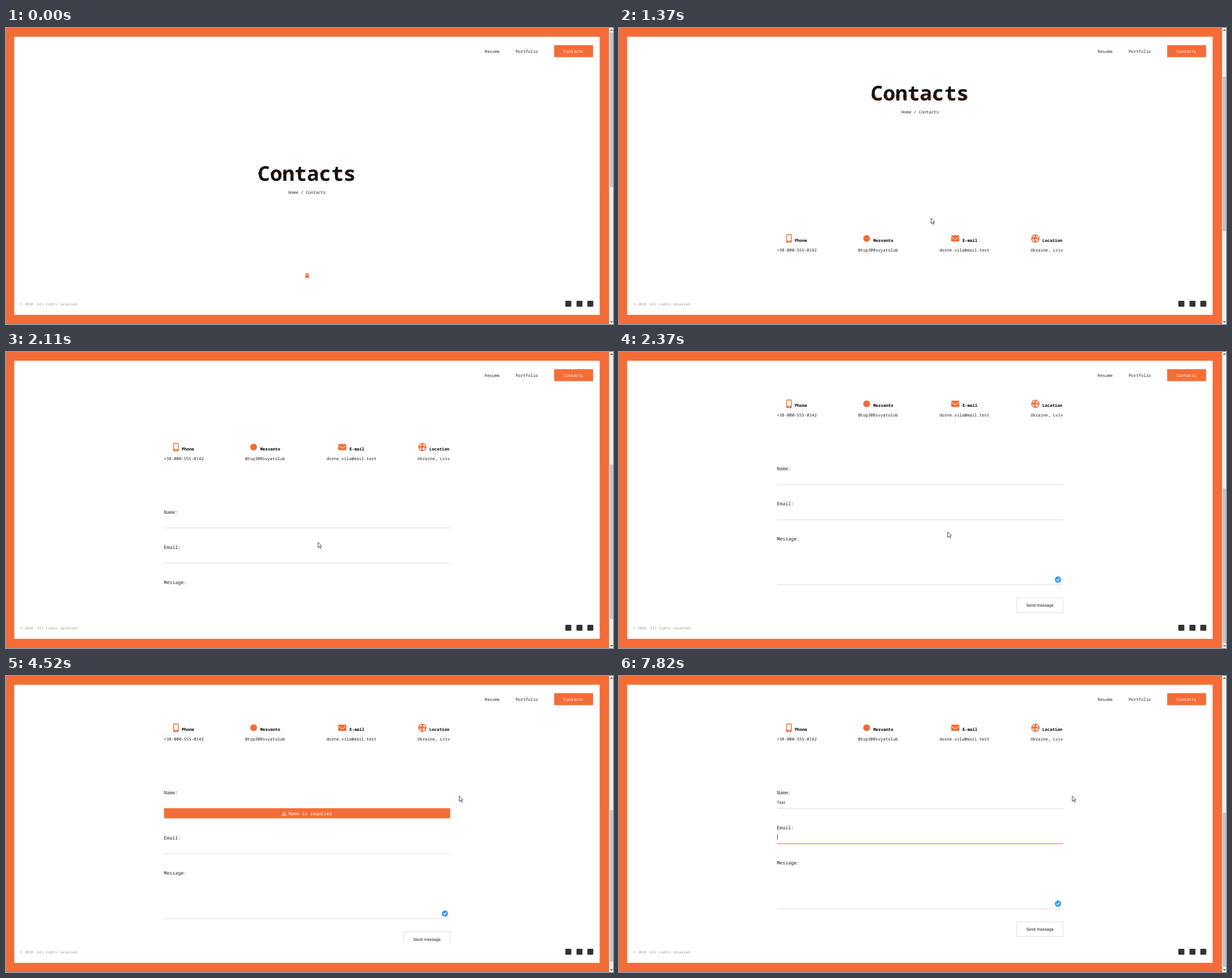
An HTML page for the animation above (8000 ms loop, 1070 px wide and 523 px high).

```html
<!DOCTYPE html>
<html lang="en">
<head>
<meta charset="utf-8">
<title>Contacts</title>
<style>
  html, body { margin: 0; width: 100%; height: 100%; overflow: hidden; background: #f46d38; }
  svg { display: block; }
  text { font: 7.33px "Noto Sans Mono", "DejaVu Sans Mono", monospace; fill: #222; white-space: pre; text-rendering: geometricPrecision; }
  .title { font-size: 36px; font-weight: 700; fill: #141414; }
  .bold { font-weight: 700; fill: #000; }
  .label { font-size: 8.4px; }
  .ui { font-family: Roboto, Arial, sans-serif; }
  .small { font-size: 6.14px; fill: #999; }
  .note { font-size: 7.9px; }
  .white { fill: #fff; }
  .orange { fill: #f46d38; }
  .line { fill: #dcdcdc; }
  .dark { fill: #333; }
  .stroke { fill: none; stroke: #fff; }
</style>
</head>
<body>
<svg width="1070" height="523" viewBox="0 0 1070 523">
  <defs>
    <clipPath id="view"><rect x="15" y="83" width="1031" height="388.6"/></clipPath>
    <clipPath id="band"><rect id="bandRect" x="430" width="200"/></clipPath>
  </defs>

  <rect class="orange" width="1063" height="523"/>
  <rect class="white" x="14.5" y="15.5" width="1032" height="491.3"/>

  <g clip-path="url(#view)">
    <g id="page">
      <text class="title" x="443.8" y="269.5">Contacts</text>
      <g clip-path="url(#band)">
        <text class="title orange" x="444.9" y="269.7">Contacts</text>
        <text class="title" x="443.3" y="269.5">Contacts</text>
      </g>
      <text x="497.7" y="292.6">Home / Contacts</text>
      <g id="mouse">
        <rect class="orange" x="527.6" y="-4.6" width="6.4" height="9.2" rx="3"/>
        <path class="stroke" stroke-width=".7" d="M527.4 -1.2H534.2M530.8 -4.7V-1.2"/>
      </g>

      <g transform="translate(0 422)">
        <!-- phone -->
        <rect class="orange" x="294.8" y="84" width="9.6" height="15" rx="1.6"/>
        <rect class="white" x="296.3" y="85.5" width="6.6" height="9.8" rx=".3"/>
        <circle class="white" cx="299.6" cy="97.1" r=".9"/>
        <text class="bold" x="309.7" y="97.4">Phone</text>
        <text x="278.3" y="114.2">+38-000-555-0142</text>
        <!-- messenger -->
        <circle class="orange" cx="436.5" cy="91.5" r="6"/>
        <text class="bold" x="448.2" y="97.4">Mesvanto</text>
        <text x="421.4" y="114.2">@top300svyatolub</text>
        <!-- mail -->
        <rect class="orange" x="585.5" y="86" width="14.6" height="11" rx="1.4"/>
        <path class="stroke" d="M585.3 88.2L591.4 92.7Q592.8 93.6 594.2 92.7L600.3 88.2"/>
        <text class="bold" x="605.4" y="97.4">E-mail</text>
        <text x="564.9" y="114.2">dorne.vila@mail.test</text>
        <!-- globe -->
        <circle class="orange" cx="734" cy="91.6" r="7.3"/>
        <path class="white" d="M729 88.5L731 86.6 733.4 86.2 732.2 88.4 730.4 90.2ZM735.4 86.1L738.2 87.6 739.6 90.2 737.2 90.4 735.2 88.8ZM728.6 92.4L731.6 93 732.4 95.4 731 97 729.4 95.4ZM734.2 92.2L737.4 92.6 739.2 94 736.6 97 734.8 96.2Z"/>
        <text class="bold" x="746.3" y="97.4">Location</text>
        <text x="725.4" y="114.2">Ukraine, Lviv</text>

        <text class="label" x="278.2" y="209.1">Name:</text>
        <text class="ui" id="typed" x="278.6" y="225.6"></text>
        <rect class="line" x="278.5" y="233.8" width="504.5" height="1"/>
        <rect class="orange" id="nameFocus" x="278.5" y="233.8" width="504.5" height="1"/>

        <g id="error">
          <path class="orange" d="M278.5 233.8H783V248.4Q783 251.6 779.8 251.6H281.7Q278.5 251.6 278.5 248.4Z"/>
          <path class="stroke" stroke-width=".9" stroke-linejoin="round" d="M490.3 240.5L493.7 246.4H486.9ZM490.3 242.2V244.6M490.3 245.1V245.8"/>
          <text class="note white" x="498.3" y="246.3">Name is required</text>
        </g>

        <g id="rest">
          <text class="label" x="278.2" y="271.3">Email:</text>
          <rect class="line" x="278.5" y="295.8" width="504.5" height="1"/>
          <rect class="orange" id="mailFocus" x="278.5" y="295.8" width="504.5" height="1"/>
          <text class="label" x="278.2" y="333.4">Message:</text>
          <rect class="line" x="278.5" y="411" width="504.5" height="1"/>
          <circle cx="773.8" cy="402.2" r="5.6" fill="#3f9ff0"/>
          <path class="stroke" stroke-width="1.2" d="M771.2 402.4L773.1 404.2 776.5 400.5"/>
          <rect x="701.2" y="434.3" width="81.4" height="26.4" fill="#fff" stroke="#dcdcdc" stroke-width=".9"/>
          <text class="ui" x="718" y="450.4">Send message</text>
        </g>
        <rect id="caret" width=".9" height="9" fill="#222"/>
      </g>
    </g>
  </g>

  <text x="843.8" y="43.7">Resume</text>
  <text x="898.2" y="43.7">Portfolio</text>
  <rect class="orange" x="966.3" y="30.3" width="68.6" height="21.2"/>
  <text class="white" x="982.8" y="43.7">Contacts</text>

  <text class="small" x="25.6" y="490.2">© 2020. All rights reserved.</text>
  <rect class="dark" x="986" y="482" width="10.6" height="10.4" rx="1.4"/>
  <rect class="dark" x="1005.6" y="482" width="10.6" height="10.4" rx="1.4"/>
  <rect class="dark" x="1024.7" y="482" width="10.6" height="10.4" rx="1.4"/>

  <rect x="1063" width="7" height="523" fill="#f1f1f1"/>
  <rect id="thumb" x="1064" width="6" fill="#c4c4c6"/>
  <path d="M1065.2 5L1067.2 3 1069.2 5M1065.2 518L1067.2 520 1069.2 518" fill="none" stroke="#444" stroke-width="1.1"/>

  <path id="cursor" d="M0 0V9.6L2.2 7.6 3.7 10.9 5.2 10.2 3.8 7.1H6.7Z" fill="#fff" stroke="#222" stroke-width=".8"/>
</svg>
<script>
const LOOP = 8000, ERROR_H = 17.4, VIEW_H = 494, PAGE_H = 916, TRACK = 506;
const $ = id => document.getElementById(id);
const set = (id, attrs) => { for (const k in attrs) $(id).setAttribute(k, attrs[k]); };
const clamp = x => Math.max(0, Math.min(1, x));
const linear = x => x;
const smooth = x => x * x * (3 - 2 * x);

// keys: [time, value, value, ...]
function track(keys, t, ease) {
  const i = keys.findIndex(k => k[0] > t);
  if (i < 0) return keys[keys.length - 1].slice(1);
  if (i === 0) return keys[0].slice(1);
  const a = keys[i - 1], b = keys[i], p = ease((t - a[0]) / (b[0] - a[0]));
  return a.slice(1).map((v, n) => v + (b[n + 1] - v) * p);
}

const scrollKeys = [[930, 0], [1450, 167], [1630, 167], [1690, 196.5], [1940, 334], [2060, 334], [2110, 345], [2260, 422]];
const cursorKeys = [[0, 1033, 524], [600, 550, 338], [900, 550, 338], [1100, 550, 336], [2280, 550, 336],
  [2640, 735, 222], [2740, 735, 222], [2950, 793, 250], [3160, 805, 238], [3470, 799, 212]];
const caretFlips = [2670, 3220, 3720, 4520, 5030, 6080, 6650, 7320, 7820];
const keyPresses = [5210, 5330, 5460, 5590];
const caretSteps = [0, 4.4, 8.2, 12, 14.4];
const passed = (times, t) => times.filter(x => t >= x).length;

function draw(t) {
  const [scroll] = track(scrollKeys, t, linear);
  const [cx, cy] = track(cursorKeys, t, smooth);
  const extra = t >= 4020 && t < 5210 ? ERROR_H : 0;
  const total = PAGE_H + extra;

  set('page', { transform: `translate(0 ${-scroll})` });
  set('thumb', { y: 8 + TRACK * scroll / total, height: TRACK * VIEW_H / total });
  set('cursor', { transform: `translate(${cx} ${cy})` });

  // title glitch: a jumping slice with an orange edge
  const k = Math.floor(t / 120);
  const half = 2 + 13 * Math.sin(k * Math.PI / 10) ** 2;
  const mid = 257 + 6 * Math.sin(k * Math.PI * 3 / 5);
  set('bandRect', { y: mid - half, height: 2 * half });

  const bob = 440 - 2.5 * Math.cos(t * Math.PI / 660);
  set('mouse', { transform: `translate(0 ${bob})`, opacity: clamp(1 - scroll / 80) });

  const mail = clamp((t - 6640) / 120);
  set('nameFocus', { opacity: clamp((t - 2670) / 120) * (1 - mail) });
  set('mailFocus', { opacity: mail });
  set('error', { opacity: extra ? 1 : 0 });
  set('rest', { transform: `translate(0 ${extra})` });

  const typed = passed(keyPresses, t), inMail = t >= 6650;
  $('typed').textContent = 'Test'.slice(0, typed);
  set('caret', {
    x: 278.8 + (inMail ? 0 : caretSteps[typed]),
    y: inMail ? 280 : 218,
    opacity: passed(caretFlips, t) % 2
  });
}

function tick() {
  draw(performance.now() % LOOP);
  requestAnimationFrame(tick);
}
tick();
</script>
</body>
</html>
```
